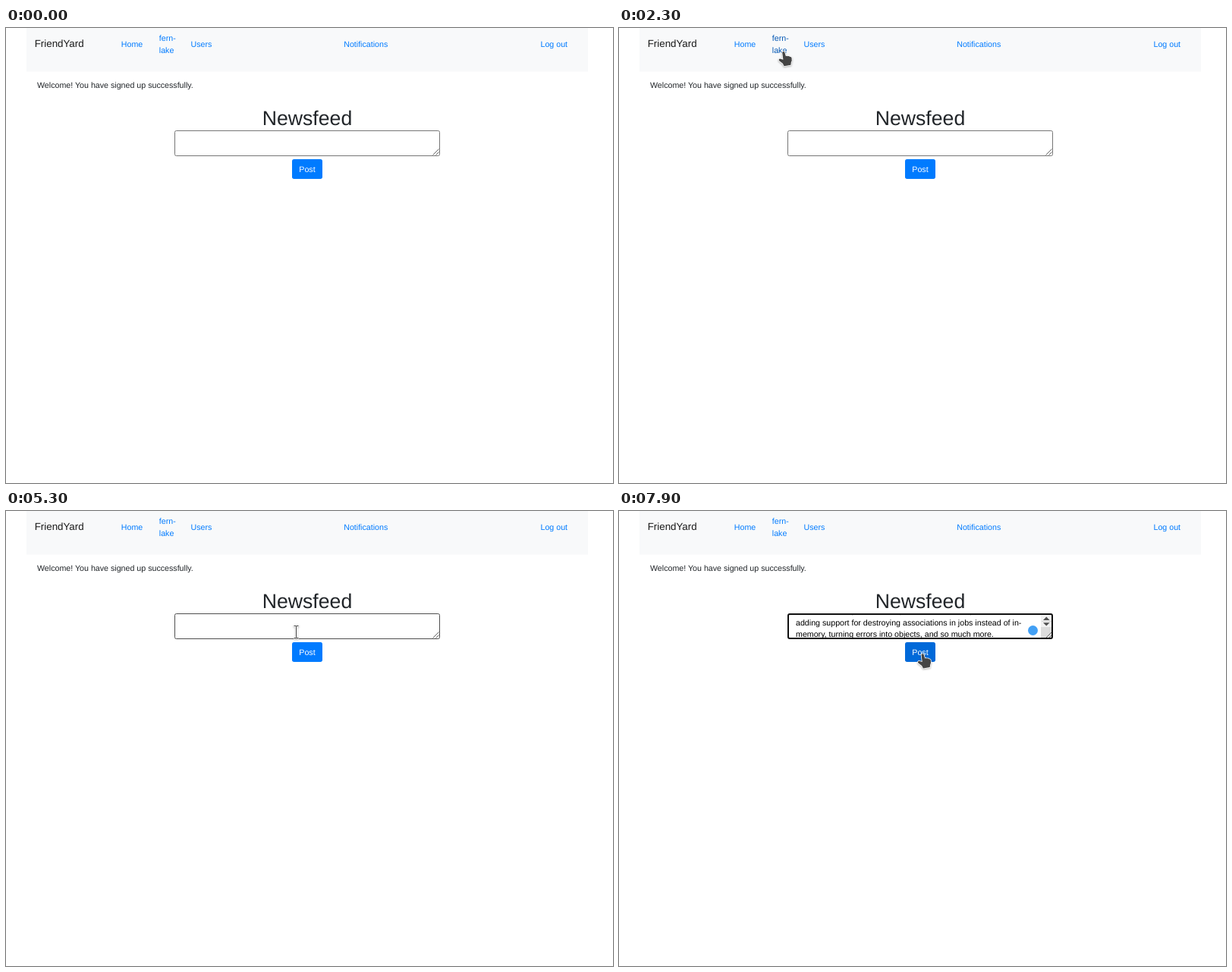
Animation, 800 px wide and 600 px high, one loop 8 s. Source, as an HTML page:

```html
<!DOCTYPE html>
<html lang="en">
<head>
<meta charset="utf-8">
<title>Newsfeed</title>
<style>
  html, body { margin: 0; width: 100%; height: 100%; overflow: hidden; background: #fff; }
  svg { display: block; width: 800px; height: 600px; }
  text { font: 10.667px "Liberation Sans", Arial, sans-serif; fill: #212529; text-rendering: geometricPrecision; }
  .link { fill: #007bff; }
  .link.on { fill: #0056b3; }
  .brand { font-size: 13.333px; fill: #1a1a1a; }
  .title { font-size: 26.667px; text-anchor: middle; }
  .typed text { fill: #000; }
  .cursor path { fill: #444; stroke: #fff; stroke-width: 1.6; stroke-linejoin: round; paint-order: stroke; }
  .cursor { filter: drop-shadow(0 1px 1px rgba(0, 0, 0, .3)); }
</style>
</head>
<body>
<svg viewBox="0 0 800 600" xmlns="http://www.w3.org/2000/svg">
  <defs>
    <clipPath id="inner"><rect x="224" y="137" width="332" height="30"/></clipPath>
  </defs>
  <rect x="27" width="740" height="57.5" fill="#f8f9fa"/>
  <text class="brand" x="37.7" y="25">FriendYard</text>
  <text class="link" id="home" x="151.8" y="25">Home</text>
  <text class="link" id="profile" x="201.8" y="17">fern-<tspan x="201.8" y="33">lake</tspan></text>
  <text class="link" id="users" x="243.5" y="25">Users</text>
  <text class="link" x="445.2" y="25">Notifications</text>
  <text class="link" id="logout" x="704.5" y="25">Log out</text>
  <text x="41" y="79">Welcome! You have signed up successfully.</text>
  <text class="title" x="397" y="128">Newsfeed</text>

  <g id="typed" class="typed">
    <g clip-path="url(#inner)">
      <text x="233" y="135.1">the strict loading modes and per-table locks and plain sessions,</text>
      <text x="233" y="150.8">adding support for destroying associations in jobs instead of in-</text>
      <text x="233" y="166.4">memory, turning errors into objects, and so much more.</text>
    </g>
    <rect x="556" y="137" width="14" height="16" fill="#f1f1f1"/>
    <rect x="556" y="153" width="14" height="14" fill="#dcdcdc"/>
    <path d="M559 144 L563.3 139.4 L567.6 144Z M559 147.2 H567.6 L563.3 151.6Z" fill="#505050"/>
    <path d="M557 145.5 H570" stroke="#d4d4d4"/>
  </g>
  <circle id="badge" cy="157.5" r="6.5" fill="#42a0f5"/>
  <path d="M562.5 167.5 L570.5 159.5 M566.5 167.5 L570.5 163.5" stroke="#555" stroke-width=".9"/>
  <rect id="field" fill="none"/>
  <rect id="caret" width="1" height="12" fill="#000"/>

  <rect id="button" x="377" y="173" width="40" height="26" rx="2.7"/>
  <text x="386.3" y="190" style="fill:#fff">Post</text>

  <g id="pointer" class="cursor">
    <path id="arrow" d="M0 .5 V16.8 L3.6 13.6 L6.4 19.2 L9.2 17.9 L6.7 12.4 L11.6 12Z"/>
    <path id="hand" d="M-1.8 1.2 Q-.4 -.9 1.2 .8 L2.9 6.2 Q4.3 5.2 5.5 6.3 Q7.2 5.5 8.1 7 Q9.8 6.6 10.5 8.3 Q11.3 11.8 9.8 14.6 L9.4 17.8 L.6 19.2 L-1.2 15.8 L-5.8 12.3 Q-7.2 10.2 -5 9.4 L-.6 10.8Z"/>
    <path id="beam" d="M-3 -8.5 H-.9 L0 -8 L.9 -8.5 H3 V-7.5 H.5 V7.5 H3 V8.5 H.9 L0 8 L-.9 8.5 H-3 V7.5 H-.5 V-7.5 H-3Z"/>
  </g>
</svg>
<script>
const LOOP = 8000, FOCUS = 5600, BADGE = 5900, PASTE = 7000;
const el = id => document.getElementById(id);
const show = (id, on) => el(id).setAttribute('visibility', on ? 'visible' : 'hidden');
const set = (id, attrs) => {
  for (const name in attrs) el(id).setAttribute(name, attrs[name]);
};

// Each run starts at a time and takes one stop every 100 ms: x, y, shape, hovered item
const runs = [
  [600, [664, 188], [640, 174], [578, 140], [490, 105], [400, 75], [320, 52], [265, 38],
        [215, 30, 'hand', 'profile'], [161.3, 27, 'hand', 'home']],
  [2100, [172, 28, 'hand', 'home'], [192, 30], [217, 31, 'hand', 'profile']],
  [2800, [221, 33, 'hand', 'profile'], [245, 33], [267, 30, 'hand', 'users']],
  [3800, [290, 32], [372, 32], [455, 31]],
  [4300, [484.8, 25], [597, 26]],
  [4600, [622, 25], [665, 24], [712, 26, 'hand', 'logout'], [737, 26, 'hand', 'logout']],
  [5100, [705, 60], [520, 125], [382.5, 159.5, 'beam', 'field'], [376, 163, 'beam', 'field'],
         [372, 164, 'beam', 'field'], [371.5, 161.5, 'beam', 'field']],
  [6900, [373, 162, 'beam'], [376, 163, 'beam'], [380, 164, 'beam'], [385, 165, 'beam'],
         [391, 178, 'hand', 'button'], [396, 184, 'hand', 'button'],
         [400, 190, 'hand', 'button'], [400.3, 188.3, 'hand', 'button']]
];

function stopAt(t) {
  const run = runs.filter(r => r[0] <= t).pop();
  return run && run[Math.min(run.length - 1, 1 + Math.floor((t - run[0]) / 100))];
}

function caretOn(t) {
  if (t < FOCUS) return false;
  if (t >= PASTE) return t < PASTE + 500;
  return t < 6300 || t >= 6800;
}

function draw(t) {
  const stop = stopAt(t);
  const [x, y, shape = 'arrow', hover] = stop || [0, 0];
  set('pointer', { transform: `translate(${x} ${y})` });
  for (const id of ['arrow', 'hand', 'beam']) show(id, stop && id === shape);
  for (const id of ['home', 'profile', 'users', 'logout']) el(id).classList.toggle('on', id === hover);
  set('button', { fill: hover === 'button' ? '#0069d9' : '#007bff' });

  const focused = t >= FOCUS, pasted = t >= PASTE;
  const width = focused ? 2 : 1, inset = width / 2;
  set('field', {
    x: 222 + inset, y: 135 + inset, width: 350 - width, height: 34 - width, rx: 2,
    'stroke-width': width,
    stroke: focused ? '#101010' : hover === 'field' ? '#4f4f4f' : '#767676'
  });
  show('typed', pasted);
  show('badge', t >= BADGE);
  set('badge', { cx: pasted ? 545.5 : 560.5 });
  show('caret', caretOn(t));
  set('caret', pasted ? { x: 494, y: 155 } : { x: 233, y: 138 });
}

let start;
function tick(now) {
  start ??= now;
  draw((now - start) % LOOP);
  requestAnimationFrame(tick);
}
draw(0);
requestAnimationFrame(tick);
</script>
</body>
</html>
```
